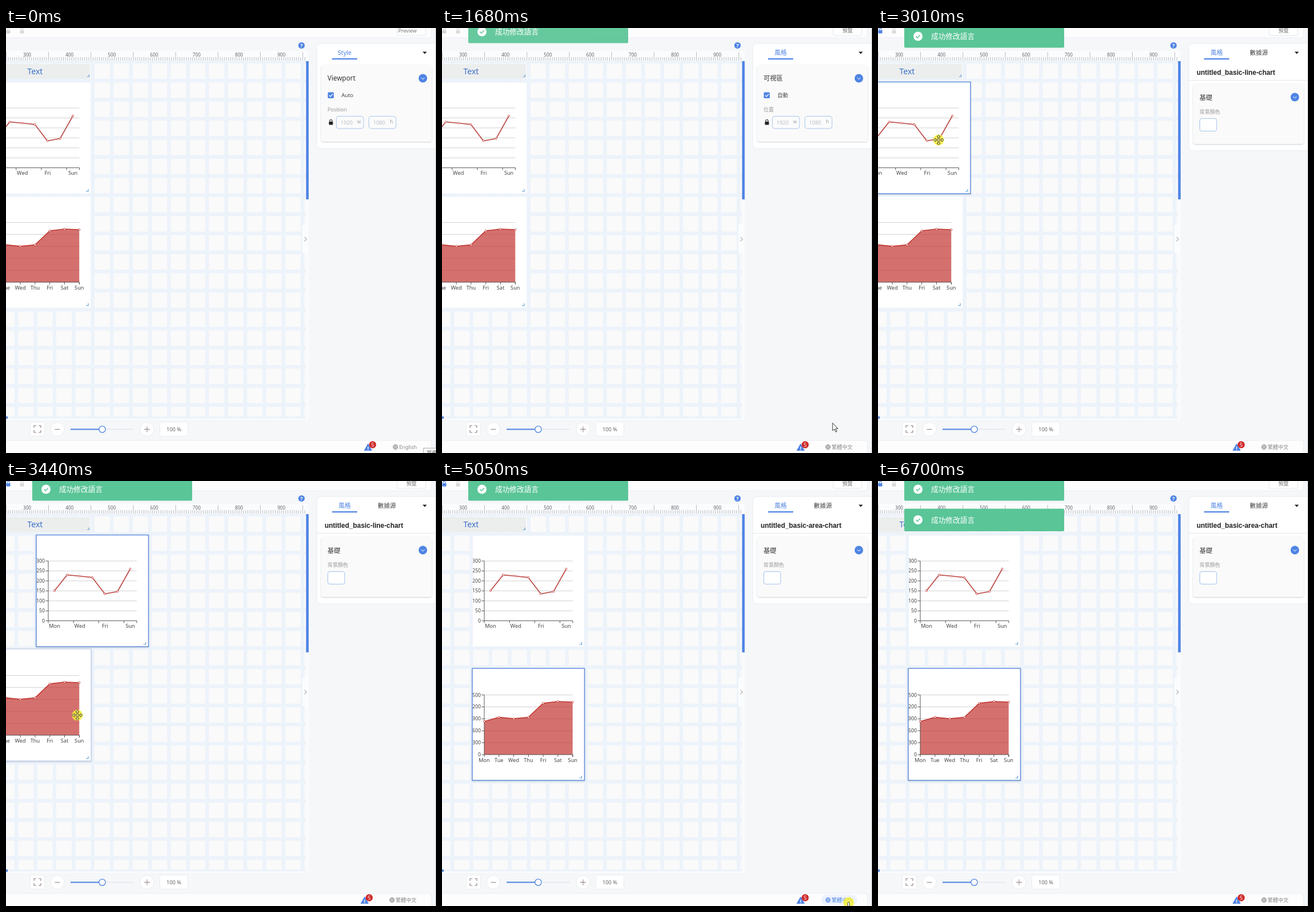
Animation of 753x744 px, one loop 7.03 s. Source, as an HTML page:

```html
<!DOCTYPE html>
<html lang="en">
<head>
<meta charset="utf-8">
<title>Dashboard editor</title>
<style>
html, body { margin: 0; width: 100%; height: 100%; overflow: hidden; background: #f5f7f9; }
svg { display: block; width: 753px; height: 744px; }
text { font-family: "Noto Sans", "Noto Sans CJK TC", "Noto Sans CJK", sans-serif; white-space: pre; }
.name { font-family: "Liberation Sans", Arial, sans-serif; font-weight: bold; }
</style>
</head>
<body>
<svg id="stage" viewBox="0 0 753 744" xmlns="http://www.w3.org/2000/svg"></svg>
<script>
const LOOP = 7030, BLUE = '#4f84e4', RED = '#c23531';
const stage = document.getElementById('stage');

// Markup helpers
const rect = (x, y, w, h, fill, more = '') =>
  `<rect x="${x}" y="${y}" width="${w}" height="${h}" fill="${fill}" ${more}/>`;
const circle = (x, y, r, fill, more = '') =>
  `<circle cx="${x}" cy="${y}" r="${r}" fill="${fill}" ${more}/>`;
const path = (d, stroke, width = 1, fill = 'none', more = '') =>
  `<path d="${d}" stroke="${stroke}" stroke-width="${width}" fill="${fill}" ${more}/>`;
const text = (x, y, size, fill, str, anchor = 'start', more = '') =>
  `<text x="${x}" y="${y}" font-size="${size}" fill="${fill}" text-anchor="${anchor}" ${more}>${str}</text>`;
const group = (id, body, more = '') => `<g id="${id}" ${more}>${body}</g>`;
const repeat = (n, fn) => Array.from({ length: n }, (_, i) => fn(i)).join('');
const lock = (x, y, color) =>
  rect(x - 3.5, y - 1, 7, 5.5, color, 'rx=".8"') +
  path(`M${x - 2} ${y - 1}v-1.5a2 2 0 0 1 4 0v1.5`, color, 1.2);

function canvasArea() {
  const cells = repeat(19, r => repeat(17, c => {
    const x = -12 + c * 33.4, w = Math.min(27, 525 - x);
    return w > 0 ? rect(x.toFixed(1), (62 + r * 33.4).toFixed(1), w, Math.min(27, 680 - 62 - r * 33.4).toFixed(1), '#fafafa') : '';
  }));
  const ticks = repeat(142, i => `M${(i * 3.71 + .3).toFixed(1)} ${i % 20 ? 51 : 42}V57`);
  const labels = repeat(7, i => text(37 + i * 74.2, 50, 8.2, '#60656e', 300 + i * 100, 'middle'));
  return rect(0, 40, 530, 17.5, '#fbfcfd') + rect(0, 57.5, 526, 626, '#edf3fa') + cells +
    path(ticks, '#a9adb3', .8) + labels +
    rect(525.5, 58, 4.5, 626, '#fafbfc') + rect(525.5, 58, 4.5, 242, BLUE) +
    rect(0, 680, 3, 4, BLUE) + rect(0, 684, 530, 1.5, '#fdfdfe') +
    path('M530 340L519 345V393L530 399Z', 'none', 0, '#fbfcfd') +
    path('M522.5 366l4 3.7-4 3.7', '#888', 1);
}

function frameBars() {
  return rect(-10, -20, 755, 37, '#fdfdfe', 'rx="5" stroke="#eceff3"') +
    rect(685, -12, 50, 25, '#fff', 'rx="3" stroke="#e3e6ea"') +
    lock(28, 5, '#d9d9d9') + group('lockOff', lock(4, 5, '#d4d4d4')) + group('lockOn', lock(4, 5, BLUE)) +
    circle(517.5, 30.5, 5.6, BLUE) + text(517.5, 34, 9.5, '#fff', '?', 'middle', 'font-weight="bold"') +
    rect(-10, 722, 755, 40, '#fdfdfe', 'rx="5" stroke="#e9edf2"');
}

function zoomBar() {
  const box = (x, w) => rect(x, 690, w, 24.5, '#fff', 'rx="3" stroke="#eaecef"');
  const knob = x => circle(x, 702.5, 12, '#fff', 'stroke="#eaecef"');
  return box(42.5, 25) + path('M49 700v-4h4M57 696h4v4M61 704v4h-4M53 708h-4v-4', '#8d8585', 1.2) +
    knob(90) + path('M85.500 702.500h9', '#8d7f7f') +
    path('M113 702.500H224', '#e3e8ef', 1.5) + path('M113 702.500H168', BLUE, 2) +
    circle(168.5, 702.5, 5.7, '#fff', `stroke="${BLUE}" stroke-width="1.3"`) +
    knob(247) + path('M242 702.500h10M247 697.500v10', '#8d7f7f') +
    box(269.500, 49) + text(294, 706, 9.3, '#666', '100 %', 'middle');
}

function plot(points, base, step, max, by, xLabels, filled) {
  const ys = repeat(max / by, i => `M74 ${(base - (i + 1) * step).toFixed(1)}H229`);
  const line = 'M' + points.map(p => p.join(' ')).join('L');
  const gap = filled ? 25.8 : 44.2;
  const ticks = repeat(filled ? 7 : 4, i => `M${74 + i * gap} ${base}v4`) + `M229 ${base}v4` +
    repeat(max / by + 1, i => `M69.500 ${(base - i * step).toFixed(1)}H74`);
  return path(ys, '#ccc', .9) +
    (filled ? path(`${line}V${base}H74Z`, 'none', 0, RED, 'fill-opacity=".7"') : '') +
    path(line, filled ? RED : '#bd4b47', 1.7) +
    path(`M74 ${base - step * max / by}V${base}H229` + ticks, '#444', .9) +
    points.map(([x, y]) => circle(x, y, 1.6, '#fff', `stroke="${RED}" stroke-width=".8"`)).join('') +
    repeat(max / by + 1, i => text(68, base - i * step + 3, 8.8, '#444', i * by, 'end')) +
    xLabels.map((s, i) => text(filled ? 74 + i * gap : 85 + i * gap, base + 12.5, 9.2, '#444', s, 'middle')).join('');
}

function chart(id, top, height, body) {
  const outline = (key, color, w) => group(id + key,
    rect(53, top - 1.5, 196.5, height + 2, '#fff', `stroke="${color}" stroke-width="${w}" filter="url(#soft)"`));
  return group(id, rect(54, top, 194.5, height, '#fff') + outline('Hover', '#bccbe8', 1.1) + outline('Sel', '#5b8cdc', 1.4) +
    `<svg x="54" y="${top}" width="194" height="${height}" viewBox="54 ${top} 194 ${height}">${body}</svg>` +
    path(`M240.500 ${top + height - 3.5}h4v-4`, '#5a9bd0', 1.1));
}

function panel(height, body, cardY, cardH, tab) {
  return rect(545, 28, 212, height, '#fff', 'rx="6" filter="url(#faint)"') +
    text(593, 47, 10.8, BLUE, tab, 'middle') + rect(571, 53, 44, 2.2, BLUE) +
    path('M729.500 41.500h7.500l-3.700 4z', 'none', 0, '#222') +
    rect(552, cardY, 193.5, cardH, '#fafafa', 'rx="4" filter="url(#soft)"') +
    circle(730, cardY + 23, 7.5, BLUE) + path(`M727 ${cardY + 22}l3 2.800 3-2.800`, '#fff') + body;
}

function viewPanel(tab, title, auto, place, titleSize) {
  const field = (x, n, unit) => rect(x, 154.5, 47.5, 21.5, '#fbfbfb', 'rx="4" stroke="#a9c6ea"') +
    text(x + 7.5, 168.5, 9.2, '#b9bec7', n) + text(x + 39.5, 166.500, 8.5, '#9ba3ad', unit, 'middle');
  return panel(182, text(563, 92, titleSize, '#333', title) +
    rect(563.5, 112.500, 10.5, 10.5, BLUE, 'rx="1.500"') + path('M566 117.800l2.200 2.300 4-4.600', '#fff', 1.3) +
    text(587.5, 121.3, 9.3, '#444', auto) + text(563, 146, 9, '#999', place) +
    lock(569, 165, '#222') + field(578.5, '1920', 'w') + field(635.5, '1080', 'h'), 65, 134, tab);
}

function chartPanel() {
  return panel(186, text(667, 47, 10.6, '#444', '數據源', 'middle') +
    text(558, 82, 11.9, '#222', '', 'start', 'id="title" class="name"') +
    path('M545 91.500H753', '#e4e7eb') + text(563, 125.5, 11.2, '#333', '基礎') +
    text(563, 150, 9, '#999', '背景顏色') +
    rect(563.5, 158.500, 29.500, 22, '#fff', 'rx="3.500" stroke="#a3c0ec"'), 98, 105, '風格');
}

function footer(id, dx, label) {
  const x = 682 + dx;
  return group(id, path(`M${634 + dx} 728l6.500 11.500h-13z`, BLUE, 1, BLUE, 'stroke-linejoin="round"') +
    text(634 + dx, 738.5, 9, '#fff', '!', 'middle', 'font-weight="bold"') +
    circle(642 + dx, 729.5, 6.2, '#cf2b2b') + text(642 + dx, 733, 9, '#fff', '5', 'middle') +
    group(id + 'Bg', rect(664, 724.5, 63, 17, '#edf3fd', 'rx="8"')) +
    `<g id="${id}Lang" color="#888">` + path(`M${x - 4} 733.500h8M${x} 729.500v8M${x} 729.500c-3 2-3 6 0 8c3-2 3-6 0-8`, 'currentColor', .8) +
    circle(x, 733.5, 4, 'none', 'stroke="currentColor"') +
    text(x + 6.5, 737, 9.1, 'currentColor', label) + '</g>');
}

const toast = id => group(id, rect(46, -5, 280, 39.5, '#5ac597', 'rx="2"') + circle(70, 14.5, 8, '#fff') +
  path('M66.500 14.500l2.600 2.700 4.600-5', '#5ac597', 1.5) + text(93, 19.3, 12.7, '#fff', '成功修改語言'));

const pointer = group('halo', circle(0, 0, 9.5, '#f4ef3c', 'fill-opacity=".85"')) +
  group('arrow', path('M0 0V13.500L3.200 10.600 5.500 15.800 7.500 14.900 5.300 9.800H9.300Z', '#333', 1, '#fff')) +
  group('move', path('M0-9l3 3.300H1V-1H5.700v-2L9 0 5.700 3V1H1v4.700h2L0 9l-3-3.300h2V1h-4.700v2L-9 0l3.300-3v2H-1v-4.700h-2z', '#5a5418', 1, '#f4f0a0')) +
  group('hand', path('M-1.500 8V.800a1.500 1.500 0 0 1 3 0V6l5 1.200v5L5 15.500H-1L-5 9.500l1.500-1z', '#444', .9, '#fff'));

const line = [[85, 192], [107, 164.5], [129, 166.5], [151, 168.8], [173, 197.5], [195.3, 193.5], [217.5, 154]];
const area = [421, 413.5, 416, 413.5, 389, 386, 387].map((y, i) => [+(74 + i * 25.8).toFixed(1), y]);

stage.innerHTML = `<defs>
  <filter id="soft" x="-10%" y="-10%" width="120%" height="125%"><feDropShadow dx="0" dy="1" stdDeviation="1.200" flood-color="#456" flood-opacity=".28"/></filter>
  <filter id="faint"><feDropShadow dx="0" dy="0" stdDeviation="1.500" flood-color="#456" flood-opacity=".08"/></filter></defs>` +
  rect(0, 0, 753, 744, '#f5f7f9') + canvasArea() +
  rect(-5, 63, 152, 26, '#eceeee') + text(51, 81, 14, '#3e70c8', 'Text', 'middle') + path('M142 85h3.500v-3.500', '#5a9bd0', 1.1) +
  chart('lineChart', 96, 193.5, plot(line, 244.7, 17.45, 300, 50, ['Mon', 'Wed', 'Fri', 'Sun'])) +
  chart('areaChart', 329.5, 194, plot(area, 479, 20.9, 1500, 300, ['Mon', 'Tue', 'Wed', 'Thu', 'Fri', 'Sat', 'Sun'], true)) +
  frameBars() + zoomBar() +
  group('viewEn', viewPanel('Style', 'Viewport', 'Auto', 'Position', 11.7)) +
  group('viewZh', viewPanel('風格', '可視區', '自動', '位置', 11.2)) +
  group('chartSide', chartPanel()) +
  text(703, 7.5, 8.9, '#777', 'Preview', 'middle', 'id="previewEn"') + text(710, 7.5, 9, '#777', '預覽', 'middle', 'id="previewZh"') +
  footer('footEn', 0, 'English') + footer('footZh', -6, '繁體中文') +
  group('menu', rect(665, 667, 54, 53, '#fff', 'rx="3" stroke="#e6eaf0"') + text(692, 684, 9.1, '#777', 'English', 'middle') + text(692, 709, 9, BLUE, '繁體中文', 'middle')) +
  path('M752.500 0V744', '#c4c6ca') +
  group('tip', rect(731, 735.500, 30, 20, '#fafafa', 'stroke="#aaa"') + text(737, 747, 9, '#777', '繁體')) +
  toast('toast2') + toast('toast1') + group('pointer', pointer);

const el = id => document.getElementById(id);
const show = (id, on) => el(id).setAttribute('display', on ? 'inline' : 'none');
const shift = (id, x, y) => el(id).setAttribute('transform', `translate(${x.toFixed(2)} ${y.toFixed(2)})`);
const within = (t, ...spans) => spans.some(([a, b]) => t >= a && t < b);

// Steps are [time, x, y], joined with straight motion
const cursorSteps = [[0, 760, 762], [70, 742, 748], [210, 712, 738], [560, 712, 738], [750, 691, 704], [1190, 688, 698],
  [1540, 685, 693], [1680, 684, 692], [1890, 682, 580], [2170, 480, 300], [2250, 400, 260], [2520, 110, 200], [2600, 93, 196],
  [2980, 93, 196], [3220, 194, 196], [3270, 194, 205], [3440, 125, 410], [3510, 125, 410], [3650, 215, 458], [3790, 226, 444],
  [3980, 467, 555], [4250, 680, 695], [4390, 712, 738], [5200, 712, 738], [5460, 685, 695], [5850, 685, 695],
  [6200, 706, 715], [6440, 716, 726], [6700, 760, 760]];
const lineSteps = [[2980, -100.5, 0], [3220, 0, 0]];
const areaSteps = [[3510, -100.5, -34], [3650, -11, 14], [3790, 0, 0]];

function at(steps, t) {
  const i = steps.findIndex(s => s[0] > t);
  if (i <= 0) return (i ? steps[steps.length - 1] : steps[0]).slice(1);
  const [a, b] = [steps[i - 1], steps[i]], u = (t - a[0]) / (b[0] - a[0]);
  return [1, 2].map(k => a[k] + (b[k] - a[k]) * u);
}

function slideToast(id, t, start, rest) {
  const u = Math.min(1, Math.max(0, (t - start) / 400)), e = 1 - (1 - u) ** 2.3;
  show(id, t > start);
  shift(id, 0, rest - 40 * (1 - e));
  el(id).setAttribute('opacity', Math.min(1, e * 1.16).toFixed(3));
}

function draw(t) {
  const zh = t >= 1260, picked = t >= 2600, areaPicked = t >= 3580;
  show('viewEn', !zh); show('previewEn', !zh); show('footEn', !zh);
  show('viewZh', zh && !picked); show('previewZh', zh); show('footZh', zh);
  show('chartSide', picked); show('lockOn', picked); show('lockOff', !picked);
  el('title').textContent = `untitled_basic-${areaPicked ? 'area' : 'line'}-chart`;

  shift('lineChart', ...at(lineSteps, t));
  shift('areaChart', ...at(areaSteps, t));
  show('lineChartSel', picked && !areaPicked);
  show('lineChartHover', within(t, [2480, 2600]));
  show('areaChartSel', areaPicked);
  show('areaChartHover', within(t, [3340, 3580]));

  const hover = within(t, [210, 700], [4650, 5260]);
  for (const id of ['footEn', 'footZh']) {
    show(id + 'Bg', hover);
    el(id + 'Lang').setAttribute('color', hover ? BLUE : '#888');
  }
  show('menu', within(t, [600, 1330], [5200, 5850]));
  show('tip', t < 70);
  slideToast('toast1', t, 1480, 0);
  slideToast('toast2', t, 5880, 53.5);

  const move = within(t, [2480, 3860]), hand = hover || within(t, [700, 1330], [5260, 5850]);
  const [x, y] = at(cursorSteps, t);
  shift('pointer', x, y);
  show('pointer', t >= 70 && t < 6700);
  show('move', move); show('hand', hand); show('arrow', !move && !hand);
  show('halo', within(t, [420, 600], [1120, 1260], [2600, 3220], [3400, 3790], [4900, 5200], [5740, 5850]));
}

const begin = performance.now();
(function tick() {
  draw((performance.now() - begin) % LOOP);
  requestAnimationFrame(tick);
})();
</script>
</body>
</html>
```
